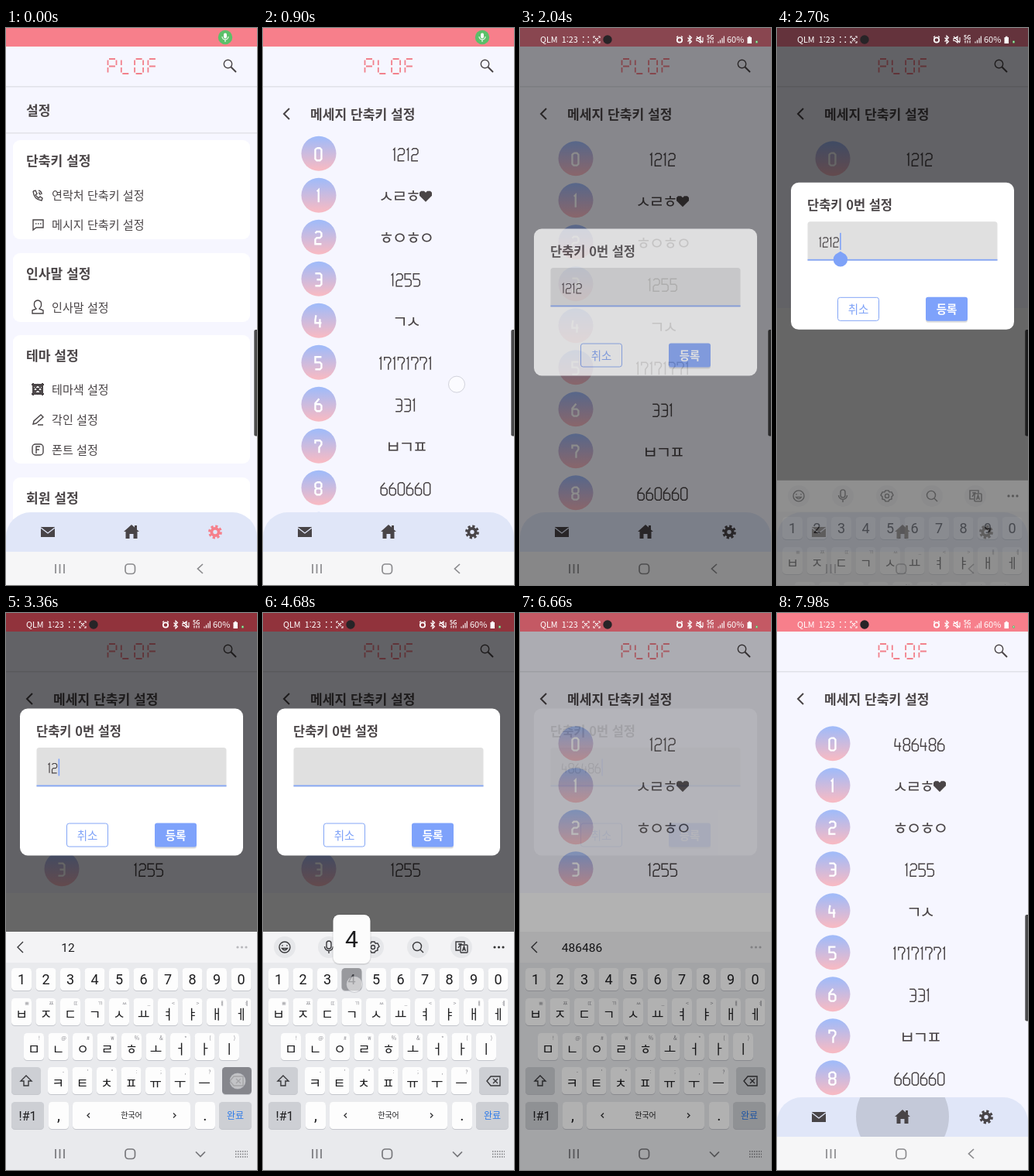
An HTML page for the animation above (8 s loop, 324x720 px).

```html
<!DOCTYPE html>
<html lang="ko">
<head>
<meta charset="utf-8">
<title>단축키 설정</title>
<style>
html, body { margin: 0; width: 100%; height: 100%; overflow: hidden; background: #fff; }
svg { display: block; width: 100%; height: 100%; }
text { font-family: "Noto Sans CJK KR", "Noto Sans CJK", "Noto Sans", sans-serif; fill: #4a4547; }
.h { font-size: 17.1px; font-weight: 700; }
.m { font-size: 15.1px; }
.c { text-anchor: middle; }
.jamo { font-size: 22px; letter-spacing: -.13em; text-anchor: middle; }
.line { fill: none; stroke: #4a4547; stroke-width: 1.4; }
.lcd { fill: none; stroke: #4a4547; stroke-width: 1.5; }
.logo { fill: none; stroke: #f2818c; stroke-width: 1.8; }
.nav { fill: none; stroke: #8b8b8e; stroke-width: 1.7; }
.key { fill: #fdfdfd; }
.fn { fill: #cdcfd4; }
.kt { font-family: Roboto, "Noto Sans CJK KR", "Noto Sans CJK", sans-serif; fill: #1d1d1f; text-anchor: middle; }
.sub { font-size: 7px; fill: #8a8a90; text-anchor: middle; }
.kl { fill: none; stroke: #38383b; stroke-width: 1.4; }
.st { fill: none; stroke: #fff; stroke-width: 1.1; }
</style>
</head>
<body>
<svg id="stage" viewBox="0 0 324 720" preserveAspectRatio="none">
  <defs>
    <linearGradient id="ball" x2="0" y2="1">
      <stop offset=".05" stop-color="#a2bbf8"/><stop offset=".95" stop-color="#f6bac4"/>
    </linearGradient>
    <clipPath id="pageClip"><rect id="pageCut" y="24" width="324" height="653"/></clipPath>
    <clipPath id="listClip"><rect y="136" width="324" height="600"/></clipPath>
    <clipPath id="barClip"><rect y="626" width="324" height="51"/></clipPath>
    <g id="gear">
      <circle r="4.6" fill="none" stroke="currentColor" stroke-width="3.8"/>
      <circle r="7.4" fill="none" stroke="currentColor" stroke-width="3" stroke-dasharray="3.2 2.61"/>
    </g>
    <path id="frame" class="st" d="M95 13V11H97M101 11H103V13M103 17V19H101M97 19H95V17M97 13L101 17M101 13L97 17"/>
  </defs>

  <rect width="324" height="720" fill="#fff"/>
  <g clip-path="url(#pageClip)">
    <rect y="24" width="324" height="653" fill="#f6f6ff"/>
    <g id="menu"></g>
    <g id="short">
      <rect y="76" width="324" height="601" fill="#f6f6ff"/>
      <path class="line" style="stroke-width:2" d="M34 104L27 111L34 118"/>
      <text class="h" x="61" y="117.6">메세지 단축키 설정</text>
      <g id="list" clip-path="url(#listClip)"></g>
    </g>
    <rect y="75" width="324" height="1.6" fill="#e2e3ea"/>
    <path id="logo" class="logo"/>
    <g class="line"><circle cx="286.5" cy="46.5" r="5.2"/><path stroke-width="2" d="M290.5 50.5L297 57"/></g>
  </g>

  <g id="tabs" fill="#484447">
    <rect y="626" width="324" height="90" rx="32" fill="#e0e6f8"/>
    <circle id="ripple" cx="162" cy="651" r="60" clip-path="url(#barClip)" fill="#000" fill-opacity=".125"/>
    <path d="M45 645H63V658H45Z"/><path d="M45 646L54 653L63 646" fill="none" stroke="#e0e6f8" stroke-width="1.3"/>
    <path d="M152 651L162 642L166 645.5V643H169V648.5L172 651H169.5V660H164.5V654H159.5V660H154.5V651Z"/>
    <use id="cog" href="#gear" x="270" y="651.5"/>
  </g>
  <rect y="677" width="324" height="43" fill="#f6f6f7"/>
  <g class="nav">
    <path d="M64 693V705M69.5 693V705M75 693V705M254 693L247.5 699L254 705"/>
    <rect x="154" y="693" width="12.5" height="12.5" rx="4"/>
  </g>
  <rect id="edge" x="320.3" y="390" width="6" height="137.5" rx="2" fill="#4a4a4c"/>

  <rect id="dim" width="324" height="720"/>
  <g id="dialog">
    <rect x="18" width="288" height="190" rx="10" fill="#fff"/>
    <text x="39" y="35" font-size="16.5" font-weight="700">단축키 0번 설정</text>
    <path d="M39.5 101V54Q39.5 50.5 43 50.5H281Q284.5 50.5 284.5 54V101Z" fill="#e0e0e0"/>
    <rect x="39.5" y="99" width="245" height="1.8" fill="#84a6f6"/>
    <path id="value" class="lcd" style="stroke-width:1.2"/>
    <rect id="caret" y="65" width="1.6" height="22" fill="#7ea2f8"/>
    <path id="drop" d="M0 89L6.5 93A9.2 9.2 0 1 1 -6.5 93Z" fill="#7ea2f8"/>
    <rect x="78.5" y="148.5" width="53" height="30" rx="3" fill="#fff" stroke="#84a6f6"/>
    <text class="c" x="105" y="169.5" font-size="14.5" style="fill:#7ea2f8">취소</text>
    <rect x="192" y="149" width="54" height="32" rx="3" fill="#00000022"/>
    <rect x="192" y="148" width="54" height="31" rx="3" fill="#7ea2fb"/>
    <text class="c" x="219" y="169.5" font-size="14.5" font-weight="700" style="fill:#fff">등록</text>
  </g>

  <g id="board"></g>

  <rect id="status" width="324" height="24"/>
  <g id="info">
    <text x="26" y="18.5" font-size="10.8" style="fill:#fff">QLM&#8201; 1:23</text>
    <use id="scan" href="#frame" x="-14"/>
    <path id="dots" fill="#fff" d="M81 11h1.5v1.5h-1.5zM87.5 11h1.5v1.5h-1.5zM81 17.5h1.5v1.5h-1.5zM87.5 17.5h1.5v1.5h-1.5z"/>
    <use href="#frame"/>
    <circle cx="113" cy="15" r="5.7" fill="#272427"/>
    <g class="st">
      <circle cx="206" cy="15.5" r="3.2" stroke-width="1.8"/><path d="M202 12L204 10.5M210 12L208 10.5"/>
      <path d="M216.5 12.5L221.5 17.5L219 20V10L221.5 12.5L216.5 17.5"/>
      <path d="M228 13.5H230L233 11V19L230 16.5H228ZM228 11L236 19M236 12V18"/>
    </g>
    <text x="241" y="14.5" font-size="7" font-weight="700" style="fill:#fff">5G</text>
    <path class="st" d="M243 16V19.5M246 19.5V16M249 19.5V16M256 19.5V17.5M258.5 19.5V15.5M261 19.5V13M263.3 19.5V10.5"/>
    <text x="267" y="19" font-size="11" style="fill:#fff">60%</text>
    <path d="M293.5 12H295V10.7H297.5V12H299V20H293.5Z" fill="#fff"/>
  </g>
  <g id="mic">
    <circle r="9.2" fill="#5bc069"/>
    <rect x="-2" y="-5.5" width="4" height="7" rx="2" fill="#fff"/>
    <path class="st" d="M-4 -1A4 4 0 0 0 4 -1M0 3V6"/>
  </g>
  <circle id="touch" r="10.5" fill="#fff" fill-opacity=".5" stroke="#777a88" stroke-opacity=".3"/>
</svg>

<script>
const LOOP = 8000;
const $ = id => document.getElementById(id);
const clamp = v => Math.max(0, Math.min(1, v));
const ramp = (t, a, b) => clamp((t - a) / (b - a));
const ease = (t, a, b) => { const p = ramp(t, a, b); return p * p * (3 - 2 * p); };
const within = (t, a, b) => t >= a && t < b;
const show = (node, on) => node.setAttribute('visibility', on ? 'inherit' : 'hidden');
const fade = (node, v) => node.setAttribute('opacity', v);
const move = (node, x, y) => node.setAttribute('transform', `translate(${x} ${y})`);
const txt = (cls, x, y, s, size) =>
  `<text class="${cls}" x="${x}" y="${y}"${size ? ` font-size="${size}"` : ''}>${s}</text>`;

// Angular display digits on an 8 x 16 cell, as x,y strokes
const DIGITS = [
  '2,0 6,0 8,2 8,14 6,16 2,16 0,14 0,2 2,0', '0,2 2,0 2,16',
  '0,2 2,0 6,0 8,2 8,6 6,8 2,8 0,10 0,16 8,16', '0,0 6,0 8,2 8,14 6,16 0,16|2,8 8,8',
  '1,0 0,6 0,10 8,10|6,5 6,16', '8,0 0,0 0,7 6,7 8,9 8,14 6,16 0,16',
  '5,0 0,6 0,14 2,16 6,16 8,14 8,9 6,7 0,7', '0,4 0,0 6,0 8,2 8,5 5,9 5,16',
  '2,0 6,0 8,2 8,6 6,8 2,8 0,6 0,2 2,0|2,8 0,10 0,14 2,16 6,16 8,14 8,10 6,8',
  '8,8 2,8 0,6 0,2 2,0 6,0 8,2 8,14 6,16 1,16'];
const advance = c => c === '1' ? 6.5 : 11.1;
const width = s => [...s].reduce((w, c) => w + advance(c), 0);
const FIELD = .77;

function digits(s, x, y, k = 1) {
  let d = '';
  for (const c of s) {
    const at = p => p.split(',').map((v, i) => (i ? y : x) + v * k).join(' ');
    for (const part of DIGITS[c].split('|')) d += 'M' + part.split(' ').map(at).join('L');
    x += advance(c) * k;
  }
  return d;
}
const centred = (s, x) => digits(s, x - (width(s) - 3) / 2, -7);

// Segment logo
const SEG = { a: '1.5 0H9.5', b: '11 1.5V8', c: '11 11V17.5', d: '1.5 19H9.5', e: '0 11V17.5', f: '0 1.5V8', g: '1.5 9.5H9.5' };
const logo = ['abefg', 'def', 'abcdef', 'aefg'].map((s, i) => {
  return [...s].map(k => {
    const [, x, y, dir, to] = SEG[k].match(/([\d.]+) ([\d.]+)([HV])([\d.]+)/);
    const ox = 131.5 + i * 17.3, oy = 40;
    return `M${ox + +x} ${oy + +y}${dir}${+to + (dir === 'H' ? ox : oy)}`;
  }).join('');
}).join('');
$('logo').setAttribute('d', logo);

// Settings page
const card = (y, h, title) =>
  `<rect x="9" y="${y}" width="306" height="${h}" rx="9" fill="#fff"/>` + txt('h', 26, y + 33, title);
const item = (y, s, icon) => txt('m', 59, y + 5.5, s) + `<g class="line" transform="translate(41 ${y})">${icon}</g>`;
$('menu').innerHTML = txt('h', 26, 112.5, '설정') + '<rect y="135" width="324" height="1.5" fill="#e3e3e8"/>' +
  card(145, 128, '단축키 설정') +
  item(216, '연락처 단축키 설정', '<path d="M-6 -5L-3 -6L-1 -2L-3 0L1 4L3 2L6 4L5 7Q-5 6 -6 -5M1 -6Q5 -5 5 -1M1 -3Q3 -3 3 0"/>') +
  item(254, '메시지 단축키 설정', '<path d="M-6 -6H7V4H-2L-6 7ZM-3 -1H-1.5M0 -1H1.5M3 -1H4.5"/>') +
  card(291, 89, '인사말 설정') +
  item(361, '인사말 설정', '<path d="M-2 2Q-6 -2 -4 -7Q0 -11 4 -7Q6 -2 2 2L7 4V8H-7V4Z"/>') +
  card(397, 166, '테마 설정') +
  item(467, '테마색 설정', '<path stroke-width="2" d="M-6 -8V8M6 -8V8M-8 -6H8M-8 6H8M-6 -6L6 6M6 -6L-6 6M0 -6L6 0L0 6L-6 0Z"/>') +
  item(506, '각인 설정', '<path d="M-6 6L-5 2L4 -6L7 -3L-2 5ZM0 7H7"/>') +
  item(545, '폰트 설정', '<rect x="-7" y="-7" width="14" height="14" rx="4"/><path d="M-2 5V-4H3M-2 0H2"/>') +
  card(581, 130, '회원 설정');

// Shortcut list
const HEART = '<path transform="translate(26 0)" fill="#4a4547" d="M0 8L-8 0V-4L-6 -6H-2L0 -4L2 -6H6L8 -4V0Z"/>';
const jamo = s => txt('jamo', 0, 8.5, s);
const lcd = s => `<path class="lcd" d="${centred(s, 0)}"/>`;
const values = [lcd('1212'), '<g transform="translate(-9 0)">' + jamo('ㅅㄹㅎ') + '</g>' + HEART, jamo('ㅎㅇㅎㅇ'), lcd('1255'),
  jamo('ㄱㅅ'), lcd('17171771'), lcd('331'), jamo('ㅂㄱㅍ'), lcd('660660'), lcd('119')];
$('list').innerHTML = values.map((v, i) =>
  `<g><circle cx="72" r="22.5" fill="url(#ball)"/>
   <path class="lcd" style="stroke:#fff;stroke-width:2.3" d="${centred(String(i), 71.5)}"/>
   <g transform="translate(184 .5)">${v}</g></g>`).join('');
const rows = [...$('list').children];
const first = rows[0].lastElementChild.firstElementChild;

// Keyboard, with its top edge at 0
const cap = (x, y, w, h, cls = 'key') =>
  `<rect x="${x}" y="${y + 1}" width="${w}" height="${h}" rx="4.5" fill="#c4c6cc"/>` +
  `<rect class="${cls}" x="${x}" y="${y}" width="${w}" height="${h}" rx="4.5"/>`;
const line = (chars, subs, x0, y, h, size) => [...chars].map((c, i) => {
  const x = x0 + i * 31.5;
  return cap(x, y, 26, h) + txt('kt', x + 13, y + h / 2 + size * .36 + (subs ? 3 : 0), c, size) +
    (subs ? txt('sub', x + 20, y + 9, subs[i].replace('<', '&lt;')) : '');
}).join('');
const tool = (x, icon) => `<g class="kl" transform="translate(${x} 20)"><circle r="14" style="fill:#e6e7ea;stroke:none"/>${icon}</g>`;
const more = color => `<g fill="${color}"><circle cx="299" cy="20" r="1.6"/><circle cx="304.5" cy="20" r="1.6"/><circle cx="310" cy="20" r="1.6"/></g>`;

$('board').innerHTML = `<rect width="324" height="308" fill="#e9eaed"/><rect width="324" height="40" fill="#f3f3f5"/>
  <g id="tools">` +
  tool(28, '<circle r="7"/><path d="M-3.5 1.5Q0 6 3.5 1.5ZM-3 -3V-1.5M3 -3V-1.5"/>') +
  tool(85, '<rect x="-3" y="-8" width="6" height="10" rx="3"/><path d="M-5.5 -1A5.5 5.5 0 0 0 5.5 -1M0 5V8"/>') +
  tool(142, '<path d="M-2 -7H2L3 -5L6 -5L8 -1L6 1L6 4L3 5L2 7H-2L-3 5L-6 4L-6 1L-8 -1L-6 -5L-3 -5Z"/><circle r="2.5"/>') +
  tool(200, '<circle cx="-1" cy="-1" r="5.5"/><path d="M3 3L7 7"/>') +
  tool(256, '<path d="M-2 4H-7V-7H4V-4M-4 -4H1M-1.5 -5V-3L-4 1"/><rect x="-1" y="-3" width="9" height="10" rx="1"/><path d="M1.5 5L3.5 -1L5.5 5M2.5 3H5"/>') +
  more('#333') + `</g>
  <g id="hints"><path class="kl" d="M22 13L15 20L22 27"/>${[80, 162, 244].map(x => txt('kt', x, 26, '', 15.5)).join('')}${more('#b8b8bc')}</g>` +
  line('1234567890', null, 7, 47, 29, 18) +
  line('ㅂㅈㄷㄱㅅㅛㅕㅑㅐㅔ', 'ㅃㅉㄸㄲㅆ_<>ㅒㅖ', 7, 86, 35, 17) +
  line('ㅁㄴㅇㄹㅎㅗㅓㅏㅣ', '!@#₩%&amp;*()'.match(/&amp;|./g), 23, 131, 35, 17) +
  line('ㅋㅌㅊㅍㅠㅜㅡ', '-\'":;,?', 54, 175, 35, 17) +
  cap(7, 175, 38, 35, 'fn') + cap(279, 175, 38, 35, 'fn') +
  cap(7, 220, 42, 35, 'fn') + cap(55, 220, 26, 35) + cap(86, 220, 152, 35) + cap(244, 220, 26, 35) + cap(275, 220, 42, 35, 'fn') +
  `<path class="kl" d="M26 186L33 193H29V199H23V193H19ZM289 193L294 187H306V199H294ZM297 190L303 196M303 190L297 196M108 234.5L105 237.5L108 240.5M216 234.5L219 237.5L216 240.5"/>` +
  txt('kt', 28, 244, '!#1', 16) + txt('kt', 68, 244, ',', 20) + txt('kt', 162, 241, '한국어', 10) + txt('kt', 257, 244, '.', 20) +
  `<text class="c" x="296" y="242" font-size="12" style="fill:#2f7be8">완료</text>
  <g class="nav" style="stroke:#77777b"><path d="M64 281V293M69.5 281V293M75 281V293M245 284.5L251 290.5L257 284.5"/>
    <rect x="154" y="281" width="12.5" height="12.5" rx="4"/>
    <path stroke-width="1.5" stroke-dasharray="1.5 1.5" d="M296 284H312M296 287.5H312M296 291H312"/></g>
  <rect id="press" rx="4.5" fill="#55575e" opacity=".6"/>
  <g id="pop"><rect x="-25" y="-23" width="50" height="66" rx="9" fill="#00000018"/><rect x="-24" y="-22" width="48" height="63" rx="8" fill="#fcfcfc"/>${txt('kt', 0, 20, '', 30)}</g>
  <rect id="shade" width="324" height="308"/>`;
const hintText = [...$('hints').querySelectorAll('text')];
const popText = $('pop').querySelector('text');

// Presses: start time and key; the text follows a moment later
const erase = [3060, 3300, 3540, 3780];
const typed = [[4660, '4'], [4940, '8'], [5200, '6'], [5480, '4'], [5800, '8'], [6140, '6']];
const LAG = 70;
const taps = [[60, 240, 130, 254], [1740, 1840, 200, 172], [2470, 2570, 150, 335], [6370, 6480, 219, 288],
  ...erase.map(t => [t, t + 130, 299, 605]),
  ...typed.map(([t, c]) => [t, t + 130, 23.5 + (c - 1) * 31.5, 480])];

function field(t) {
  const gone = erase.filter(e => t >= e).length;
  const keys = typed.filter(([e]) => t >= e + LAG);
  const edit = keys.length ? keys[keys.length - 1][0] + LAG : gone ? erase[gone - 1] : 2520;
  return { text: '1212'.slice(0, 4 - gone) + keys.map(k => k[1]).join(''), edit, keys: keys.length };
}

function finger(t) {
  const tap = taps.find(([a, b]) => within(t, a, b));
  if (tap) return tap.slice(2);
  if (within(t, 820, 1150)) return [250, 470 - 90 * ease(t, 840, 1140)];
  if (within(t, 1240, 1660)) return [235 + 9 * ramp(t, 1260, 1600), 300 + 87 * ease(t, 1260, 1600)];
  return null;
}

function drawPage(t) {
  const resized = within(t, 2640, 6770);
  $('pageCut').setAttribute('height', resized ? 338 : 653);
  fade($('short'), ease(t, 300, 500));
  show($('tabs'), !within(t, 2760, 6770));
  $('cog').style.color = t < 300 ? '#f67f8b' : '#484447';
  const scroll = 62 * (ease(t, 840, 1140) - ease(t, 1260, 1500));
  const pull = ease(t, 1480, 1610) - ease(t, 1660, 1780);
  rows.forEach((r, i) => move(r, 0, 168.7 + 54 * i - scroll + pull * (1 + .4 * i)));
  first.setAttribute('d', centred(t < 6780 ? '1212' : '486486', 0));
  show($('ripple'), t >= 7720);
  $('ripple').setAttribute('r', 20 + 40 * ease(t, 7720, 7920));
  show($('edge'), !within(t, 2760, 7050));
}

function drawDialog(t, rise, dim) {
  const { text, edit } = field(t);
  $('dim').setAttribute('opacity', .6 * dim);
  fade($('dialog'), ramp(t, 1880, 2100) * (1 - ramp(t, 6480, 6680)));
  move($('dialog'), 0, 259.5 - 136 * rise);
  $('value').setAttribute('d', digits(text, 54.5, 71, FIELD));
  const end = 54 + width(text) * FIELD;
  $('caret').setAttribute('x', end);
  show($('caret'), t >= 2520 && (t >= 6480 || (t - edit) % 600 < 300));
  move($('drop'), end + .8, 0);
  show($('drop'), within(t, 2520, 3060));
}

function drawBoard(t, rise, dim) {
  const out = ease(t, 6690, 6840);
  show($('board'), within(t, 2560, 6840));
  move($('board'), 0, 720 - 308 * (rise - out));
  fade($('board'), rise ** 1.5 * (1 - out));
  $('shade').setAttribute('opacity', t >= 6480 ? .6 * dim : 0);

  const { text, keys } = field(t);
  const hints = keys === 6 || (text && t >= 3060 && !keys) ? [text, '', ''] : keys ? ['4시에', '40분', '4학년'] : null;
  show($('tools'), !hints);
  show($('hints'), !!hints);
  if (hints) hintText.forEach((n, i) => n.textContent = hints[i]);

  const hit = typed.find(([a]) => within(t, a, a + 130));
  const del = erase.some(a => within(t, a, a + 130));
  show($('press'), hit || del);
  show($('pop'), !!hit);
  const box = hit ? [7 + (hit[1] - 1) * 31.5, 47, 26, 29] : [279, 175, 38, 35];
  ['x', 'y', 'width', 'height'].forEach((k, i) => $('press').setAttribute(k, box[i]));
  if (hit) { popText.textContent = hit[1]; move($('pop'), box[0] + 13, 0); }
}

function drawStatus(t, dim) {
  // The bar darkens with the page, then warms up once the keyboard is open
  const red = 100 + 45 * ramp(t, 2700, 2880);
  const mix = (a, b) => Math.round(a + (b - a) * dim);
  $('status').setAttribute('fill', `rgb(${mix(247, red)},${mix(127, 51)},${mix(139, 60)})`);
  fade($('info'), ramp(t, 1020, 1200));
  const shrink = ease(t, 900, 1140);
  $('mic').setAttribute('transform', `translate(${283 + 22.5 * shrink} ${12 + 6 * shrink}) scale(${1 - .82 * shrink})`);
  const beat = Math.floor((t - 4095) / 298.5);
  show($('scan'), beat % 2 === 0);
  show($('dots'), beat % 2 !== 0);
}

function render(t) {
  const rise = ease(t, 2560, 2865);
  const dim = ramp(t, 1860, 2100) * (1 - ramp(t, 6480, 6840));
  drawPage(t);
  drawDialog(t, rise, dim);
  drawBoard(t, rise, dim);
  drawStatus(t, dim);
  const at = finger(t);
  show($('touch'), !!at);
  if (at) move($('touch'), ...at);
}

let start;
function tick(now) {
  start ??= now;
  render((now - start) % LOOP);
  requestAnimationFrame(tick);
}
render(0);
requestAnimationFrame(tick);
</script>
</body>
</html>
```
